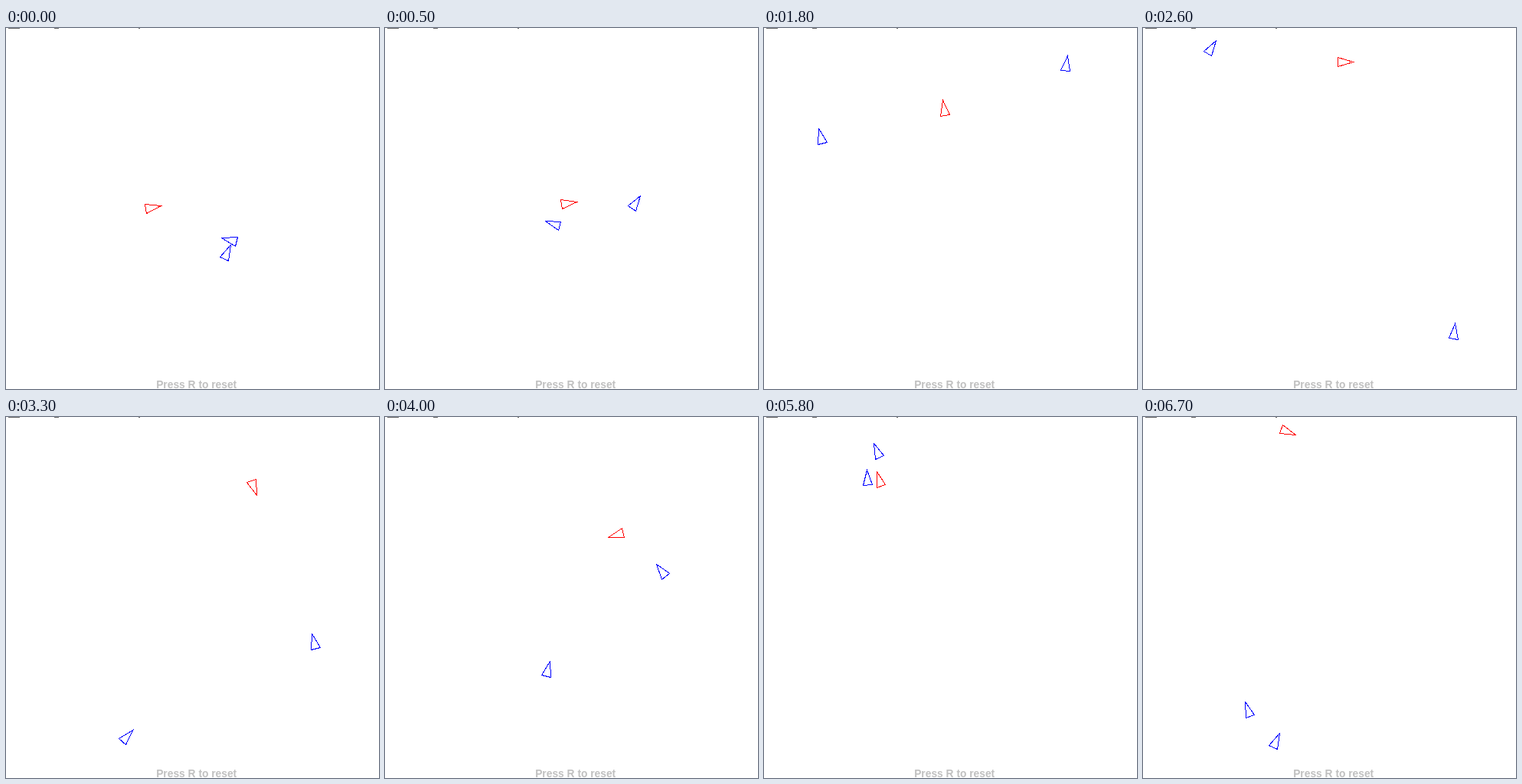
Write an HTML page that moves like this. It is 487 px wide and 472 px high and loops after 6.8 s.

```html
<!DOCTYPE html>
<html lang="en">
<head>
<meta charset="utf-8">
<title>Steering triangles</title>
<style>
  html, body { margin: 0; width: 100%; height: 100%; overflow: hidden; background: #fff; }
  svg { display: block; }
  text { font: bold 13.8px "Liberation Sans", Arial, sans-serif; fill: #c0c0c0; text-anchor: middle; }
  g, path { fill: none; shape-rendering: crispEdges; }
</style>
</head>
<body>
<svg width="487" height="472" viewBox="0 0 487 472">
  <clipPath id="field"><path d="M0 7H487V472H0Z"/></clipPath>
  <path d="M3 .5H18M63 .5H69M173 .5H175" stroke="#666"/>
  <text x="248.7" y="471">Press R to reset</text>
  <g id="ships" clip-path="url(#field)"></g>
</svg>
<script>
const LOOP = 6800, STEP = 100, WRAP = 473, EDGE = -5;

// Each ship steers through x, y, heading (degrees) at these shared times.
const times = [0, 1100, 2600, 4000, 4800, 5800, 6700];
const ships = [
  { color: 'blue', speed: 0.15, route: [
    [291, 276.5, -166], [134, 220.5, -153], [89.5, 24.5, -58], [212.5, 329, -76],
    [196, 213.5, -120], [134.5, 78.5, -92], [174, 422, -65]] },
  { color: 'blue', speed: 0.15, route: [
    [289, 292, -66], [371.5, 149.5, -70], [406, 396, -84], [360, 200, -127],
    [260, 136, -158], [147, 43, -112], [136.5, 381.5, -109]] },
  { color: 'red', speed: 0.12, route: [
    [192, 234, -12], [256, 196, -100], [264, 44, 0], [301, 154, 162],
    [236, 176.5, -172], [149.5, 80.5, -107], [189.5, 19.5, 22]] }
];

for (const ship of ships) {
  ship.node = document.createElementNS('http://www.w3.org/2000/svg', 'polygon');
  ship.node.setAttribute('stroke', ship.color);
  document.getElementById('ships').append(ship.node);
}

// Cubic Hermite value and slope from p to q with end slopes m and n.
function hermite(p, q, m, n, u) {
  const a = 2 * (p - q) + m + n, b = 3 * (q - p) - 2 * m - n;
  return [((a * u + b) * u + m) * u + p, (3 * a * u + 2 * b) * u + m];
}

function draw({ node, speed, route }, time) {
  const next = times.findIndex((t, i) => t > time || i === times.length - 1);
  const span = times[next] - times[next - 1];
  const u = (time - times[next - 1]) / span;
  const [x0, y0, h0] = route[next - 1];
  let [x1, y1, h1] = route[next];
  // Ships only leave through the top, so a big jump down means a wrap.
  if (y1 - y0 > WRAP / 3) y1 -= WRAP;

  const pull = speed * span, r0 = h0 * Math.PI / 180, r1 = h1 * Math.PI / 180;
  const [x, dx] = hermite(x0, x1, pull * Math.cos(r0), pull * Math.cos(r1), u);
  let [y, dy] = hermite(y0, y1, pull * Math.sin(r0), pull * Math.sin(r1), u);
  if (y < EDGE) y += WRAP;

  const length = Math.hypot(dx, dy), c = dx / length, s = dy / length;
  const corner = ([along, across]) => [
    Math.round(x + along * c - across * s) + 0.5,
    Math.round(y + along * s + across * c) + 0.5
  ];
  node.setAttribute('points', [[10, 0], [-10, 6], [-10, -6]].map(corner).join(' '));
}

const start = performance.now();
function tick() {
  const elapsed = (performance.now() - start) % LOOP;
  const time = Math.floor(elapsed / STEP) * STEP;
  ships.forEach(ship => draw(ship, time));
  requestAnimationFrame(tick);
}
tick();
</script>
</body>
</html>
```
